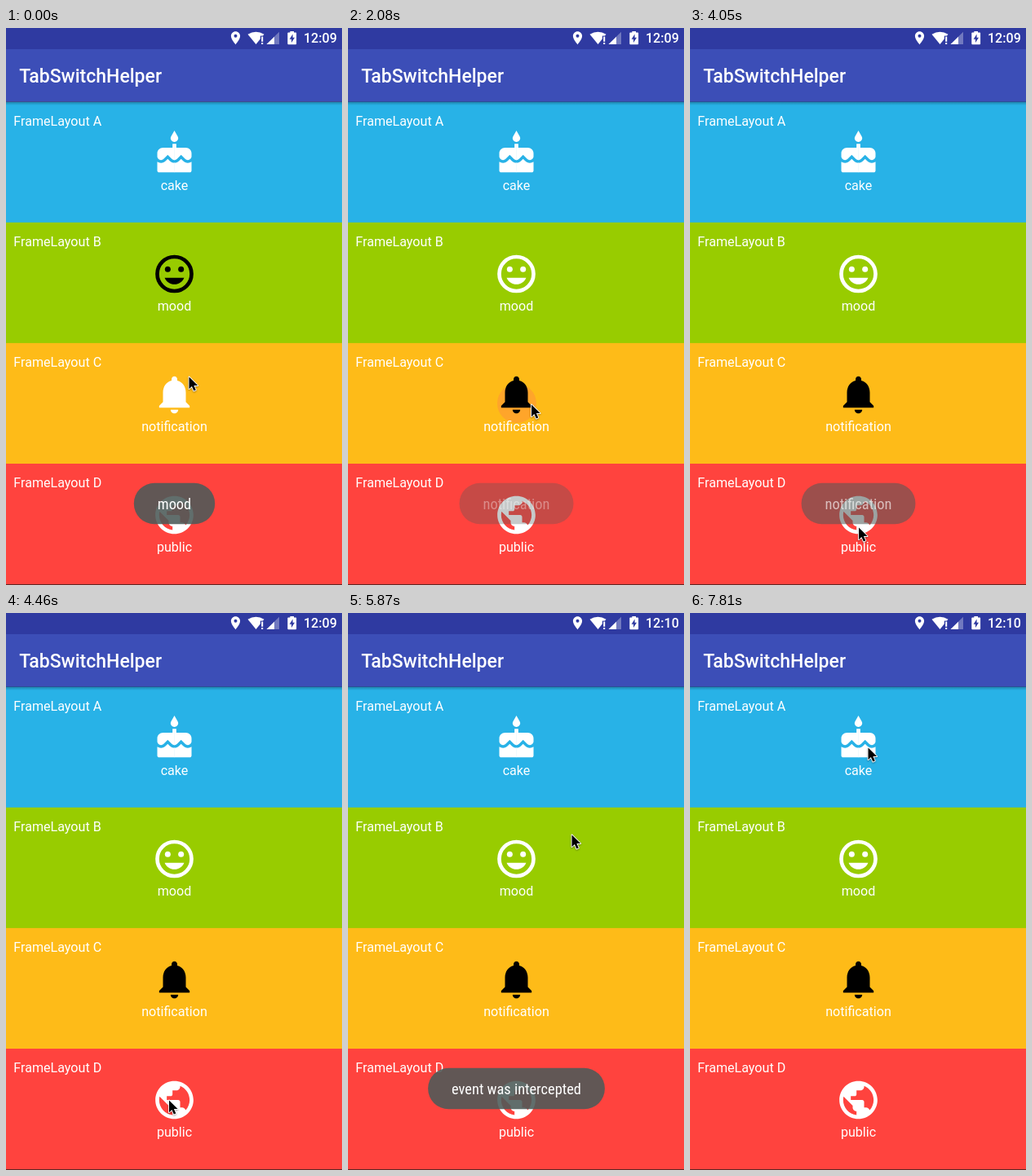
Write an HTML page with a canvas that moves like this. It is 412 px wide and 684 px high and loops after 8000 ms.

```html
<!DOCTYPE html>
<html lang="en">
<head>
<meta charset="utf-8">
<title>TabSwitchHelper</title>
<style>
html, body { margin: 0; width: 100%; height: 100%; overflow: hidden; background: #ff433e; }
canvas { display: block; width: 412px; height: 684px; }
</style>
</head>
<body>
<canvas id="stage"></canvas>
<script>
const W = 412, H = 684, LOOP = 8000, MID = 206.5;
const STATUS = '#2f3aa1', BAR = '#3c4eb7';
const canvas = document.getElementById('stage');
const ctx = canvas.getContext('2d');
const dpr = window.devicePixelRatio || 1;
canvas.width = W * dpr;
canvas.height = H * dpr;

// Icons live in a 24 unit box.
const flame = new Path2D('M12 6c1.11 0 2-.9 2-2 0-.38-.1-.73-.29-1.03L12 0l-1.71 2.97c-.19.3-.29.65-.29 1.03 0 1.1.9 2 2 2z');
const halfCake = new Path2D('M12.1 9V7H11v2H6c-1.66 0-3 1.34-3 3v1.54c0 1.08.88 1.96 1.96 1.96.52 0 1.02-.2 1.38-.57l2.14-2.13 2.13 2.13c.37.37.88.56 1.39.56h.1z' +
  'M12.1 16.97H12c-.89 0-1.78-.33-2.44-.98l-1.07-1.07-1.09 1.07C6.75 16.64 5.88 17 4.96 17c-.73 0-1.4-.23-1.96-.61V21c0 .55.45 1 1 1h8.1z');
const bell = new Path2D('M12 22c1.1 0 2-.9 2-2h-4c0 1.1.89 2 2 2zm6-6v-5c0-3.07-1.64-5.64-4.5-6.32V4c0-.83-.67-1.5-1.5-1.5s-1.5.67-1.5 1.5v.68C7.63 5.36 6 7.92 6 11v5l-2 2v1h16v-1l-2-2z');
const globe = new Path2D('M12 2C6.48 2 2 6.48 2 12s4.48 10 10 10 10-4.48 10-10S17.52 2 12 2zm-1 17.93c-3.95-.49-7-3.85-7-7.93 0-.62.08-1.21.21-1.79L9 15v1c0 1.1.9 2 2 2v1.93zm6.9-2.54c-.26-.81-1-1.39-1.9-1.39h-1v-3c0-.55-.45-1-1-1H8v-2h2c.55 0 1-.45 1-1V7h2c1.1 0 2-.9 2-2v-.41c2.93 1.19 5 4.06 5 7.41 0 2.08-.8 3.97-2.1 5.39z');
const pin = new Path2D('M12 2C8.13 2 5 5.13 5 9c0 5.25 7 13 7 13s7-7.75 7-13c0-3.87-3.13-7-7-7zm0 9.5a2.5 2.5 0 0 1 0-5 2.5 2.5 0 0 1 0 5z');
const arrow = new Path2D('M0 .5V15.2L3.4 12 5.8 17.6 8.3 16.5 5.9 11.1H10.6Z');

function disc(x, y, r) {
  ctx.beginPath();
  ctx.arc(x, y, r, 0, Math.PI * 2);
  ctx.fill();
}

function poly(...p) {
  ctx.beginPath();
  for (let i = 0; i < p.length; i += 2) ctx.lineTo(p[i], p[i + 1]);
  ctx.closePath();
  ctx.fill();
}

function rect(color, x, y, w, h) {
  ctx.fillStyle = color;
  ctx.fillRect(x, y, w, h);
}

function text(str, x, y, font, align = 'left') {
  ctx.font = font;
  ctx.textAlign = align;
  ctx.fillStyle = '#fff';
  ctx.fillText(str, x, y);
}

function cake() {
  ctx.fill(flame);
  ctx.fill(halfCake);
  ctx.translate(24, 0);
  ctx.scale(-1, 1);
  ctx.fill(halfCake);
}

function mood() {
  ctx.lineWidth = 2;
  ctx.beginPath();
  ctx.arc(12, 12, 9, 0, Math.PI * 2);
  ctx.stroke();
  disc(8.5, 9.5, 1.5);
  disc(15.5, 9.5, 1.5);
  ctx.fill(new Path2D('M12 17.5c2.33 0 4.31-1.46 5.11-3.5H6.89c.8 2.04 2.78 3.5 5.11 3.5z'));
}

const panels = [
  { name: 'A', label: 'cake', color: '#28b2e7', icon: cake },
  { name: 'B', label: 'mood', color: '#98cc00', icon: mood, dark: t => t < PICK },
  { name: 'C', label: 'notification', color: '#febb18', icon: () => ctx.fill(bell), dark: t => t >= PICK },
  { name: 'D', label: 'public', color: '#ff433e', icon: () => ctx.fill(globe, 'evenodd') }
];

const PICK = 1900;
const toasts = [
  { str: 'mood', on: -1000, off: 825 },
  { str: 'notification', on: 1980, off: 3950 },
  { str: 'event was intercepted', on: 5125, off: 7060 }
];

// Pointer stops: time, x, y.
const stops = [
  [10, 224.5, 428], [260, 227.5, 459], [640, 227.5, 459], [900, 233, 468],
  [1180, 233, 468], [1420, 225, 462], [2220, 225, 462], [2600, 360, 542],
  [2660, 373, 559], [3090, 373, 559], [3420, 262, 632], [3640, 142, 645],
  [3940, 207, 613], [4150, 207, 613], [4460, 200, 598], [5450, 200, 598],
  [5870, 274.5, 272], [6070, 274.5, 272], [6340, 214, 173], [6590, 214, 173],
  [6740, 200, 163], [7100, 200, 163], [7300, 203, 163], [7640, 203, 163], [7800, 218.5, 165]
];

const clamp = v => Math.max(0, Math.min(1, v));
const easeOut = v => 1 - (1 - clamp(v)) ** 2;

function pointer(t) {
  const i = stops.findIndex(s => s[0] > t);
  if (i === 0) return stops[0].slice(1);
  if (i < 0) return stops[stops.length - 1].slice(1);
  const [t0, x0, y0] = stops[i - 1], [t1, x1, y1] = stops[i];
  const k = (t - t0) / (t1 - t0);
  return [x0 + (x1 - x0) * k, y0 + (y1 - y0) * k];
}

// Falls back to the regular width at a smaller size.
const family = '"Roboto Condensed", Roboto, sans-serif';
let toastFont = 'condensed 18.4px ' + family;
ctx.font = toastFont;
if (ctx.measureText('event was intercepted').width > 168) toastFont = '16.2px Roboto, sans-serif';

function statusBar(t) {
  rect(STATUS, 0, 0, W, 26);
  ctx.fillStyle = '#fff';
  ctx.save();
  ctx.translate(271.9, 2.6);
  ctx.scale(0.8, 0.8);
  ctx.fill(pin, 'evenodd');
  ctx.restore();

  ctx.beginPath();
  ctx.moveTo(306.5, 20);
  ctx.lineTo(296.5, 7.8);
  ctx.quadraticCurveTo(306.5, 1.6, 316.5, 7.8);
  ctx.fill();
  rect(STATUS, 311.8, 9.6, 6, 11);
  rect('#fff', 313.2, 10.6, 2, 6.2);
  rect('#fff', 313.2, 18, 2, 2);

  ctx.fillStyle = 'rgba(255,255,255,.32)';
  poly(319.5, 20, 335, 20, 335, 4.8);
  ctx.fillStyle = '#fff';
  poly(319.5, 20, 329, 20, 329, 10.7);

  ctx.beginPath();
  ctx.roundRect(345.3, 5.6, 10.8, 14.6, 1);
  ctx.fill();
  rect('#fff', 348.4, 4, 4.6, 2);
  ctx.fillStyle = STATUS;
  poly(351.6, 7.6, 347.6, 13.8, 350, 13.8, 350, 18, 354, 11.8, 351.6, 11.8);
  text(t < 5500 ? '12:09' : '12:10', 405.8, 18, '500 16.1px Roboto, sans-serif', 'right');
}

function panel(p, i, t) {
  const top = 90.7 + i * 148.1, cy = Math.round(154 + i * 148.1);
  rect(p.color, 0, top, W, H - top);
  text('FrameLayout ' + p.name, 9.3, cy - 34, '16.1px Roboto, sans-serif');
  if (p.name === 'C' && t > 1840 && t < 2400) {
    ctx.globalAlpha = 1 - clamp((t - 2120) / 280);
    ctx.fillStyle = '#ffa52a';
    disc(MID + 0.5, 461, 24 * easeOut((t - 1840) / 240));
    ctx.globalAlpha = 1;
  }
  ctx.save();
  ctx.translate(MID - 28, cy - 28);
  ctx.scale(56 / 24, 56 / 24);
  ctx.fillStyle = ctx.strokeStyle = p.dark && p.dark(t) ? '#000' : '#fff';
  p.icon();
  ctx.restore();
  text(p.label, MID, cy + 45, '16.1px Roboto, sans-serif', 'center');
}

function appBar() {
  const g = ctx.createLinearGradient(0, 90, 0, 95);
  g.addColorStop(0, 'rgba(0,0,0,.3)');
  g.addColorStop(1, 'rgba(0,0,0,0)');
  rect(g, 0, 90, W, 5);
  rect(BAR, 0, 26, W, 64.4);
  text('TabSwitchHelper', 16.2, 67, '500 23px Roboto, sans-serif');
}

function toast(o, t) {
  const alpha = easeOut((t - o.on) / 500) - easeOut((t - o.off) / 490);
  if (t < o.on || alpha <= 0) return;
  ctx.globalAlpha = alpha;
  ctx.font = toastFont;
  const w = ctx.measureText(o.str).width + 58;
  ctx.fillStyle = 'rgba(76,90,88,.88)';
  ctx.beginPath();
  ctx.roundRect(MID - w / 2, 558.7, w, 50.6, 25.3);
  ctx.fill();
  text(o.str, MID, 591, toastFont, 'center');
  ctx.globalAlpha = 1;
}

function cursor(t) {
  const [x, y] = pointer(t);
  ctx.save();
  ctx.translate(x, y);
  ctx.lineJoin = 'round';
  ctx.lineWidth = 1.8;
  ctx.strokeStyle = '#fff';
  ctx.shadowColor = 'rgba(0,0,0,.35)';
  ctx.shadowBlur = 2 * dpr;
  ctx.shadowOffsetY = dpr;
  ctx.stroke(arrow);
  ctx.shadowColor = 'transparent';
  ctx.fillStyle = '#000';
  ctx.fill(arrow);
  ctx.restore();
}

function draw(t) {
  ctx.setTransform(dpr, 0, 0, dpr, 0, 0);
  panels.forEach((p, i) => panel(p, i, t));
  rect('#5c2522', 0, 683, W, 1);
  appBar();
  statusBar(t);
  toasts.forEach(o => toast(o, t));
  cursor(t);
}

const start = performance.now();
function tick() {
  draw((performance.now() - start) % LOOP);
  requestAnimationFrame(tick);
}
tick();
</script>
</body>
</html>
```
